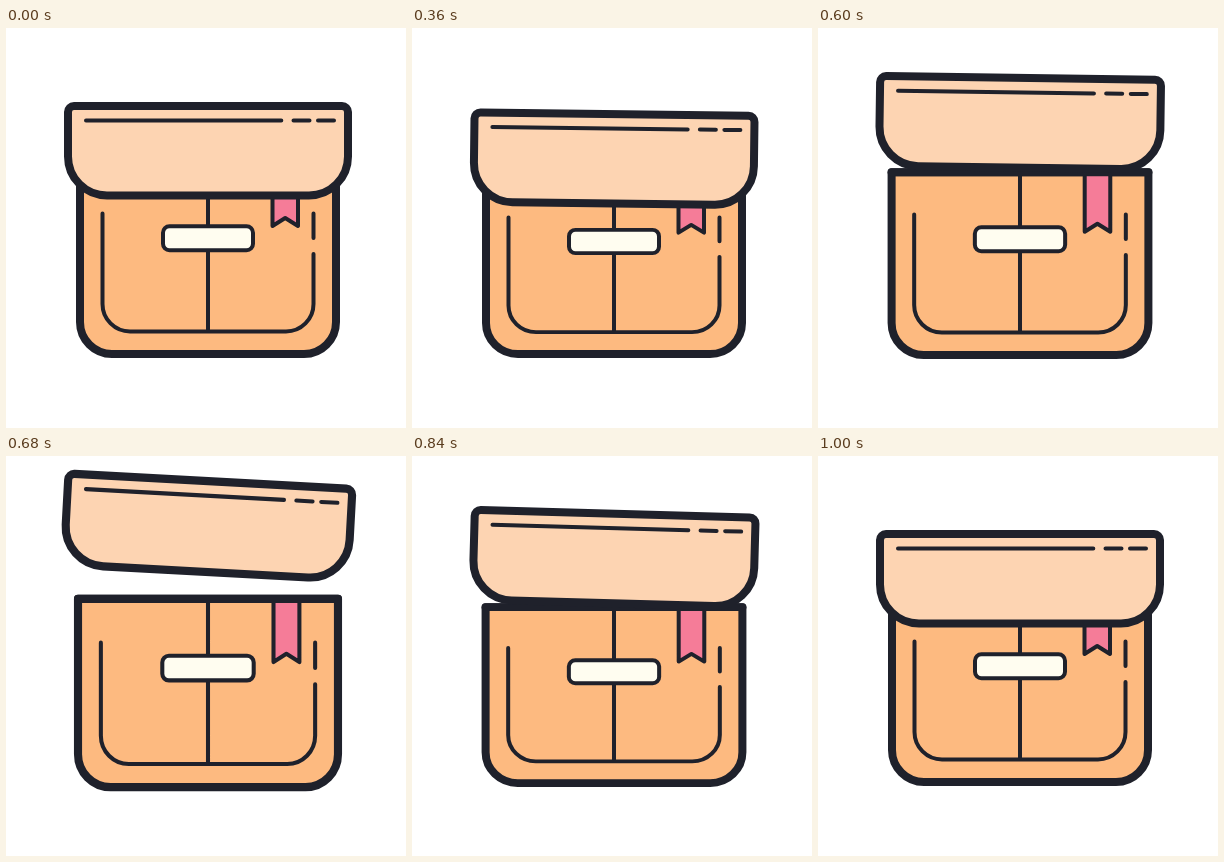
An HTML page for the animation above (1.12 s loop, 400 by 400 pixels).

```html
<!DOCTYPE html>
<html lang="en">
<head>
<meta charset="utf-8">
<title>Box</title>
<style>
  html, body { margin: 0; width: 100%; height: 100%; overflow: hidden; background: #fff; }
  svg { display: block; width: 100%; height: 100%; }
  path, rect { stroke: #1f212b; stroke-linecap: round; stroke-linejoin: round; }
  .edge { stroke-width: 8; }
  .thin { stroke-width: 4; }
  .line { fill: none; }
</style>
</head>
<body>
<svg viewBox="0 0 400 400">
  <g id="box">
    <path class="edge" fill="#fdba80" d="M74 143H330V294a32 32 0 0 1-32 32H106a32 32 0 0 1-32-32Z"/>
    <path class="thin line" d="M96.5 185.5V276a27.5 27.5 0 0 0 27.5 27.5H280a27.5 27.5 0 0 0 27.5-27.5V226M307.5 185.5V210M202 145V303.5"/>
    <rect class="thin" fill="#fffdf0" x="157" y="198.2" width="90" height="24" rx="6.5"/>
    <path id="ribbon" class="thin" fill="#f57c98" d="M266.5 140V198L279.2 190L292 198V140"/>
    <path class="edge line" d="M74 143H330"/>
  </g>
  <g id="lid">
    <path class="edge" fill="#fdd4b2" d="M68 78H336a6 6 0 0 1 6 6V128.4a39 39 0 0 1-39 39H101a39 39 0 0 1-39-39V84a6 6 0 0 1 6-6Z"/>
    <path class="thin line" d="M80 92.4H275.3M287.5 92.4H303.5M312 92.4H328"/>
  </g>
</svg>
<script>
  const LOOP = 1120, STEP = 40;
  const MID_X = 202, LID_Y = 122.5, BASE_Y = 326;
  const PEAK = 720, PULSE = 165;

  // Rest, lean right, crouch leaning left, leap, land, rest.
  const lidPoses = [
    { at: 120, tilt: 0, lift: 0 },
    { at: 280, tilt: 2.8, lift: 5.8 },
    { at: 470, tilt: -3.08, lift: 12.3 },
    { at: 700, tilt: 3.15, lift: -52.5 },
    { at: 960, tilt: 0.4, lift: 4 },
    { at: 1000, tilt: 0, lift: 0 }
  ];
  const boxPoses = [
    { at: 120, tall: 1, drop: 0 },
    { at: 280, tall: 0.977, drop: 2.5 },
    { at: 470, tall: 0.961, drop: 4.2 },
    { at: 715, tall: 1.03, drop: 4.2 },
    { at: 870, tall: 0.957, drop: 1 },
    { at: 1000, tall: 1, drop: 0 }
  ];

  const clamp = (v, lo, hi) => Math.min(hi, Math.max(lo, v));
  const ease = u => u * u * u * (10 - 15 * u + 6 * u * u);

  function poseAt(poses, time) {
    const t = clamp(time, poses[0].at, poses[poses.length - 1].at);
    const i = Math.max(1, poses.findIndex(p => p.at >= t));
    const a = poses[i - 1], b = poses[i];
    const k = ease((t - a.at) / (b.at - a.at));
    const pose = {};
    for (const key in a) pose[key] = a[key] + (b[key] - a[key]) * k;
    return pose;
  }

  // Swells from 0 to 1 and back around the top of the leap.
  const growth = t => Math.cos(Math.PI / 2 * clamp((t - PEAK) / PULSE, -1, 1)) ** 2;

  const [box, lid, ribbon] = ["box", "lid", "ribbon"].map(id => document.getElementById(id));
  const place = (el, value) => el.setAttribute("transform", value);

  function draw(now) {
    const t = Math.floor((now % LOOP) / STEP) * STEP;
    const { tilt, lift } = poseAt(lidPoses, t);
    const { tall, drop } = poseAt(boxPoses, t);
    const grow = growth(t), wide = 1 + 0.018 * grow;
    place(lid, `translate(${MID_X} ${LID_Y + lift}) rotate(${tilt}) scale(${wide}) translate(${-MID_X} ${-LID_Y})`);
    place(box, `translate(${MID_X} ${BASE_Y + 6 * grow}) scale(${wide} ${tall}) translate(${-MID_X} ${-BASE_Y})`);
    place(ribbon, `translate(0 ${drop + 2.5 * grow})`);
  }

  const start = performance.now();
  function tick() {
    draw(performance.now() - start);
    requestAnimationFrame(tick);
  }
  tick();
</script>
</body>
</html>
```
